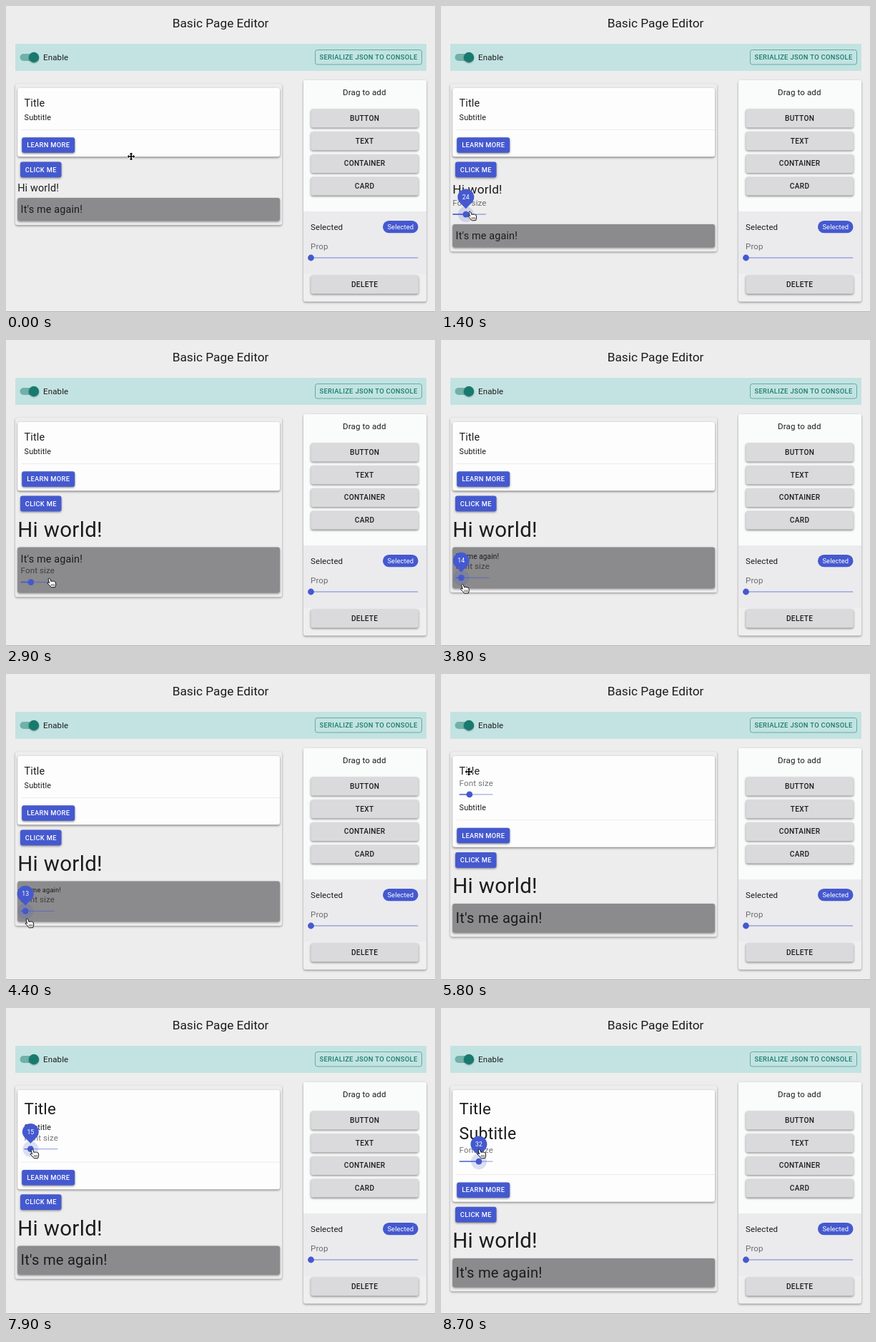
Write an HTML page with a canvas that moves like this. It is 600 px wide and 429 px high and loops after 8800 ms.

```html
<!DOCTYPE html>
<html lang="en">
<head>
<meta charset="utf-8">
<title>Basic Page Editor</title>
<style>
html, body { margin: 0; width: 100%; height: 100%; overflow: hidden; background: #eeedee; }
canvas { display: block; width: 600px; height: 429px; }
</style>
</head>
<body>
<canvas id="stage"></canvas>
<script>
const W = 600, H = 429, LOOP = 8800;
const SCALE = 0.72, LINE = 1.43;
const EDIT_H = 31.5, SLIDER_W = 47;
const BLUE = '#4559cf', INK = '#1d1c1d', MUTED = 'rgba(0,0,0,.54)', TEAL = '#187a6e';

const canvas = document.getElementById('stage');
const ctx = canvas.getContext('2d');
const dpr = window.devicePixelRatio || 1;
canvas.width = W * dpr;
canvas.height = H * dpr;

// Keyframes: [time, value...]
const sizes = {
  hi: [[1240, 20], [1400, 24], [2050, 41]],
  again: [[3300, 20], [3950, 13], [4480, 13], [5000, 28]],
  title: [[6250, 20], [6950, 31]],
  sub: [[8000, 15], [8650, 32]]
};
const pointer = [
  [0, 175, 211], [600, 44, 256], [850, 44, 256], [1180, 33, 289], [1400, 40, 288],
  [2050, 57, 302], [2250, 57, 302], [2550, 60, 334], [2900, 60, 334], [3250, 34, 338],
  [3950, 29, 343], [4480, 29, 343], [5000, 45, 347], [5150, 45, 347], [5600, 39, 137],
  [5850, 39, 137], [6200, 40, 168], [6950, 54, 177], [7100, 54, 177], [7450, 36, 198],
  [8000, 36, 198], [8650, 53, 198]
];
const selections = [[0, ''], [700, 'hi'], [2600, 'again'], [5600, 'title'], [7500, 'sub']];
const hovers = [[1120, 2180], [3180, 5100], [6100, 7100], [7550, 9000]];
const hands = [[1050, 2300], [2620, 5200], [6000, 7200], [7550, 9000]];

const clamp = (v, a, b) => Math.max(a, Math.min(b, v));
const within = (list, t) => list.find(([a, b]) => t >= a && t < b);

function track(keys, t) {
  if (t <= keys[0][0]) return keys[0].slice(1);
  for (let i = 1; i < keys.length; i++) {
    const a = keys[i - 1], b = keys[i];
    if (t < b[0]) {
      const p = (t - a[0]) / (b[0] - a[0]);
      const e = p * p * (3 - 2 * p);
      return a.slice(1).map((v, j) => v + (b[j + 1] - v) * e);
    }
  }
  return keys[keys.length - 1].slice(1);
}

function text(str, x, mid, size, o = {}) {
  ctx.font = `${o.weight || 400} ${size}px Roboto, sans-serif`;
  ctx.letterSpacing = (o.space ?? 0.0107) * size + 'px';
  ctx.textAlign = o.align || 'left';
  ctx.fillStyle = o.color || INK;
  ctx.fillText(str, x, mid + size * 0.342);
}

function box(x, y, w, h, r, fill, shadow) {
  ctx.save();
  if (shadow) {
    ctx.shadowColor = `rgba(0,0,0,${shadow})`;
    ctx.shadowBlur = 3 * dpr;
    ctx.shadowOffsetY = 1.3 * dpr;
  }
  ctx.fillStyle = fill;
  ctx.beginPath();
  ctx.roundRect(x, y, w, h, r);
  ctx.fill();
  ctx.restore();
}

function disc(x, y, r, fill) {
  ctx.fillStyle = fill;
  ctx.beginPath();
  ctx.arc(x, y, r, 0, Math.PI * 2);
  ctx.fill();
}

function button(label, x, y, w, h, fill, color, size) {
  box(x, y, w, h, 3, fill, 0.45);
  text(label, x + w / 2, y + h / 2, size, { weight: 500, space: 0.032, align: 'center', color });
}

const blueButton = (label, x, y, w) => button(label, x, y, w, 21.6, BLUE, '#fff', 9.36);
const grayButton = (label, y) => button(label, 426.3, y, 150.6, 26, '#dad9db', INK, 10.08);

function slider(x, y, w, f) {
  ctx.globalAlpha = 0.5;
  box(x, y - 0.7, w, 1.4, 0.7, BLUE);
  ctx.globalAlpha = 1;
  box(x, y - 0.7, w * f, 1.4, 0.7, BLUE);
  disc(x + w * f, y, 4.4, BLUE);
}

function balloon(x, y, value, k) {
  ctx.save();
  ctx.translate(x, y - 7.8);
  ctx.scale(k, k);
  ctx.translate(0, -16.3);
  ctx.save();
  ctx.rotate(-Math.PI / 4);
  box(-11.5, -11.5, 23, 23, [11.5, 11.5, 11.5, 0], BLUE);
  ctx.restore();
  text(value, 0, 0, 8.64, { color: '#fff', align: 'center' });
  ctx.restore();
}

function header() {
  text('Basic Page Editor', 300, 23.6, 17.28, { align: 'center', space: 0 });
  box(13, 53, 575, 38, 0, '#c2e3e1');
  box(19.5, 67, 25, 10, 5, '#70b1a9');
  ctx.save();
  ctx.shadowColor = 'rgba(0,0,0,.35)';
  ctx.shadowBlur = 2 * dpr;
  ctx.shadowOffsetY = dpr;
  disc(39, 72, 7.2, TEAL);
  ctx.restore();
  text('Enable', 52, 72, 11.52);
  ctx.strokeStyle = 'rgba(24,122,110,.6)';
  ctx.lineWidth = 0.9;
  ctx.beginPath();
  ctx.roundRect(432.5, 61.5, 149, 20.5, 3);
  ctx.stroke();
  text('SERIALIZE JSON TO CONSOLE', 507, 71.8, 9.36,
    { weight: 500, space: 0.0354, align: 'center', color: TEAL });
}

function toolbox() {
  box(416, 104, 172, 310.5, 3, '#f0eff0', 0.4);
  box(416, 104, 172, 184, [3, 3, 0, 0], '#fafbfb');
  box(416, 288, 172, 87.5, 0, '#ebebed');
  text('Drag to add', 501.3, 121.3, 11.52, { align: 'center' });
  ['BUTTON', 'TEXT', 'CONTAINER', 'CARD'].forEach((s, i) => grayButton(s, 144.5 + i * 31.7));
  text('Selected', 426, 309.6, 11.52);
  box(527, 301, 49.5, 17.3, 8.65, BLUE);
  text('Selected', 551.8, 309.6, 9.36, { color: '#fff', align: 'center' });
  text('Prop', 426, 336.8, 11.52, { color: MUTED });
  slider(426.5, 353, 149.8, 0);
  grayButton('DELETE', 377.5);
}

function page(t) {
  const size = {};
  for (const k in sizes) size[k] = Math.round(track(sizes[k], t)[0]);
  const active = selections.filter(s => s[0] <= t).pop()[1];
  const lineH = k => size[k] * SCALE * LINE;
  const blockH = k => lineH(k) + (active === k ? EDIT_H : 0);
  let edit = null;

  function line(k, str, x, top) {
    text(str, x, top + lineH(k) / 2, size[k] * SCALE);
    if (active === k) {
      const y = top + lineH(k);
      text('Font size', x, y + 6.5, 11.52, { color: MUTED });
      edit = { x, y: y + 22.6, f: (size[k] - 7) / 43, value: size[k] };
    }
  }

  const titleY = 125.7;
  const subY = titleY + blockH('title') + 2;
  const ruleY = subY + blockH('sub') + 9.3;
  const cardEnd = ruleY + 38.3;
  const hiY = cardEnd + 33.4;
  const boxY = hiY + blockH('hi') + 3.6 + (active === 'hi' ? 1.4 : 0);
  const boxH = blockH('again') + 11.6;

  box(13, 109, 373, boxY + boxH + 6 - 109, 3, '#eeedee', 0.38);
  box(16.2, 115, 366.8, cardEnd - 115, 3, '#fdfdfd', 0.45);
  box(22, ruleY, 361, 0.7, 0, '#e6e6e7');
  blueButton('LEARN MORE', 22.2, ruleY + 11.1, 74);
  blueButton('CLICK ME', 20, cardEnd + 7.2, 57.5);
  box(16.2, boxY, 366.8, boxH, 3, '#8b8a8c', 0.45);
  line('title', 'Title', 25.6, titleY);
  line('sub', 'Subtitle', 25.6, subY);
  line('hi', 'Hi world!', 16.2, hiY);
  line('again', "It's me again!", 20.6, boxY + 5.8);

  if (!edit) return;
  const thumbX = edit.x + SLIDER_W * edit.f;
  const hover = within(hovers, t);
  const k = hover ? clamp((t - hover[0]) / 150, 0, 1) * clamp((hover[1] - t) / 150, 0, 1) : 0;
  if (k > 0) disc(thumbX, edit.y, 4.4 + 6.6 * k, 'rgba(69,89,207,.18)');
  slider(edit.x, edit.y, SLIDER_W, edit.f);
  if (k > 0) balloon(thumbX, edit.y, String(edit.value), k);
}

const HAND = new Path2D('M-1 1 Q0 -1 1.6 .8 L3 4.5 Q4.3 3.3 5.2 4.4 Q6.5 3.4 7.4 4.7 Q9 4.2 9.4 6 ' +
  'L9.7 9 L8.7 12.6 L3.2 12.8 L.8 9.9 L-2 7.2 Q-2.2 5.6 -.4 6.1 L.6 6.9 Z');
const ARROWS = new Path2D('M0 -5.4 L2.3 -2.9 H.8 V-.8 H2.9 V-2.3 L5.4 0 L2.9 2.3 V.8 H.8 V2.9 H2.3 ' +
  'L0 5.4 L-2.3 2.9 H-.8 V.8 H-2.9 V2.3 L-5.4 0 L-2.9 -2.3 V-.8 H-.8 V-2.9 H-2.3 Z');

function cursor(t) {
  const [x, y] = track(pointer, t);
  ctx.save();
  ctx.translate(x, y);
  ctx.lineJoin = 'round';
  if (within(hands, t)) {
    ctx.fillStyle = '#fff';
    ctx.strokeStyle = '#111';
    ctx.lineWidth = 1;
    ctx.fill(HAND);
    ctx.stroke(HAND);
    ctx.lineWidth = 0.7;
    ctx.stroke(new Path2D('M3.4 8 V11 M5.4 8 V11 M7.3 8 V11'));
  } else {
    ctx.strokeStyle = '#fff';
    ctx.lineWidth = 1.6;
    ctx.stroke(ARROWS);
    ctx.fillStyle = '#000';
    ctx.fill(ARROWS);
  }
  ctx.restore();
}

function draw(now) {
  const t = Math.floor((now % LOOP) / 100) * 100;
  ctx.setTransform(dpr, 0, 0, dpr, 0, 0);
  box(0, 0, W, H, 0, '#eeedee');
  header();
  toolbox();
  page(t);
  box(0, 428, W, 1, 0, '#b4b3b5');
  cursor(t);
}

const start = performance.now();
function tick() {
  draw(performance.now() - start);
  requestAnimationFrame(tick);
}
tick();
</script>
</body>
</html>
```
